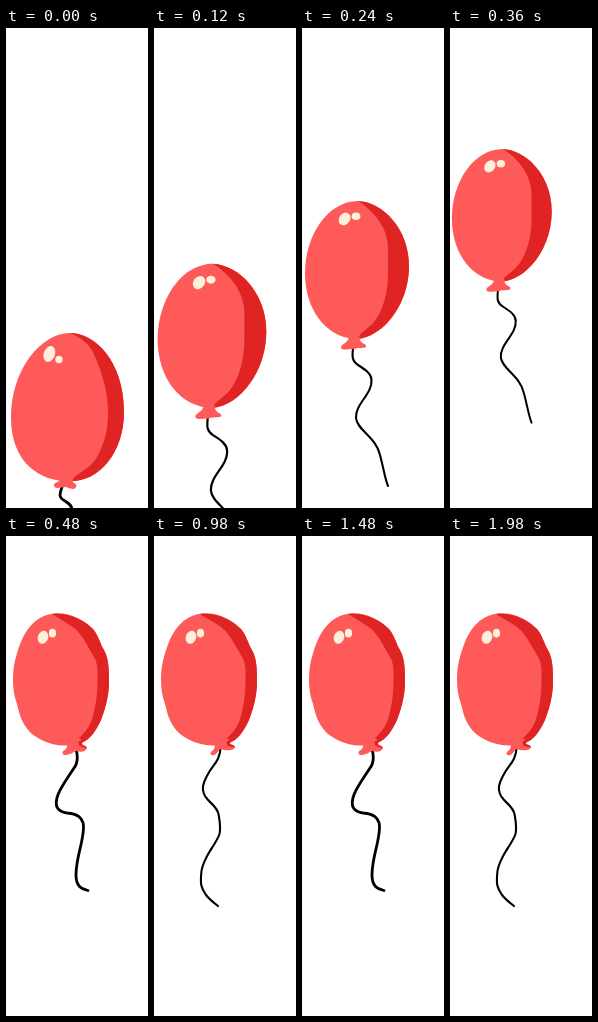
These frames come from a looping animation (142x480 px, 2480 ms). An HTML page:

```html
<!DOCTYPE html>
<html lang="en">
<head>
<meta charset="utf-8">
<title>Balloon</title>
<style>
  html, body { margin: 0; width: 100%; height: 100%; overflow: hidden; background: #fff; }
  .stage { position: relative; width: 142px; height: 480px; overflow: hidden; }
  .strip { position: absolute; left: 0; top: 0; display: block; animation: poses 2480ms step-end infinite; }
  .skin { fill: #ff5a5a; }
  .shade { fill: #e02424; }
  .shine { fill: #fcf0da; }
  .string { fill: none; stroke: #000; stroke-width: 2.1; stroke-linecap: round; stroke-linejoin: round; }
  .bold { stroke-width: 2.8; }

  /* One pose every 142px: the rise, then the string swaying */
  @keyframes poses {
    0%        { transform: translateX(0); }
    4.83871%  { transform: translateX(-142px); }
    9.67742%  { transform: translateX(-284px); }
    14.51613% { transform: translateX(-426px); }
    19.35484% { transform: translateX(-568px); }
    39.51613% { transform: translateX(-710px); }
    59.67742% { transform: translateX(-568px); }
    79.83871%, 100% { transform: translateX(-710px); }
  }
</style>
</head>
<body>
<div class="stage">
<svg class="strip" width="852" height="480" viewBox="0 0 852 480">
  <defs>
    <g id="low">
      <path class="string bold" d="M56 459C53 467 53 470 59 473C64 476 66 478 66 482"/>
      <path class="skin" d="M64 305C88 305 118 332 118 384C118 426 92 453 66 453C36 455 5 436 5 390C5 340 36 305 64 305Z"/>
      <path class="shade" d="M64 305C88 305 118 332 118 384C118 426 92 453 66 453C70 444 82 444 91 429C99 414 102 402 102 384C102 360 94 340 87 324C82 315 74 309 64 305Z"/>
      <path class="skin" d="M55 450C55 454 48 454 48 457C48 461 52 460 60 459C65 461 69 462 70 459C72 455 66 456 66 451Z"/>
      <ellipse class="shine" cx="43.3" cy="326" rx="5.6" ry="8.2" transform="rotate(20 43.3 326)"/>
      <circle class="shine" cx="53" cy="331.5" r="3.7"/>
    </g>
    <g id="mid">
      <path class="string" d="M51 320C50 329 50 333 56 337C64 342 69.5 346 69.5 352C70.5 366 53 376 54 390C55 402 74 409 78 427C82 442 83 451 86 458"/>
      <path class="skin" d="M56 173C80 174 107 200 107 238C107 276 82 308 56 311C26 311 3 284 3 245C3 207 26 173 56 173Z"/>
      <path class="shade" d="M56 173C80 174 107 200 107 238C107 276 82 308 56 311C58 303 68 302 76 288C84 274 86 258 86 244V220C86 202 74 184 56 173Z"/>
      <path class="skin" d="M47 308C47 315 39 316 39 319C39 323 45 321 52 321C58 319 64 321 64 318C64 315 57 316 58 309Z"/>
      <ellipse class="shine" cx="42.6" cy="191" rx="5.4" ry="6.8" transform="rotate(38 42.6 191)"/>
      <ellipse class="shine" cx="54" cy="188.2" rx="4.4" ry="3.8"/>
    </g>
    <g id="top">
      <path class="skin" d="M48 77.5C63 76 78 84 87 93C93 100 94 108 98 114C103 123 103 134 103 146C103 160 99 174 95 184C90 195 84 204 75 207L60 209.5C44 210 29 202 22 194C14 184 13 175 11 168C8 160 7 152 7 143C7 128 11 116 15 106C21 91 32 79 48 77.5Z"/>
      <path class="shade" d="M46 78C63 76 78 84 87 93C93 100 94 108 98 114C103 123 103 134 103 146C103 160 99 174 95 184C90 195 84 204 75 207L71 205C75 199 84 193 87 180C90 168 91.5 158 91.5 144C91.5 134 92 128 88 121C83 113 79 104 73 97C68 90 58 86 46 78Z"/>
      <ellipse class="shine" cx="37" cy="101.3" rx="5.2" ry="6.6" transform="rotate(20 37 101.3)"/>
      <ellipse class="shine" cx="46.5" cy="97.2" rx="3.6" ry="4.4"/>
    </g>
  </defs>

  <use href="#low"/>
  <use href="#mid" transform="translate(142.5 55) scale(1.045)"/>
  <use href="#mid" x="284"/>
  <use href="#mid" transform="translate(425 -45) scale(.96)"/>
  <g transform="translate(568)">
    <path class="string bold" d="M70.5 215C72 222 72 227 68 232C61 243 50 257 50.300 267C50 275 59 277 65 277.500C73 278.500 78 284 77.500 292C77 308 70 321 70 339C70 350 75 353 82 354.500"/>
    <use href="#top"/>
    <path class="skin" d="M59 207C62 210 62 212 57 215C55 219 59 220 64 218L70 215C76 217 80 215 81 212C80 208 73 210 75 203L70 202Z"/>
    <path class="shade" d="M73 205L78 205C75 207 75 209 80 210.500L81 212C76 211 71 210 73 205Z"/>
  </g>
  <g transform="translate(710)">
    <path class="string" d="M66.500 212C66 225 58 230 54 238C49 247 47 253 51 260C56 268 62 269 64.500 278C66 286 67 291 65.500 298C62 309 50 319 47.500 335C46 348 47 352 52 359C56 364 60 367 64 370"/>
    <use href="#top"/>
    <path class="skin" d="M59 207C62 210 61 213 57 216C55 220 60 220 62 218L66 213C72 215 80 215 81 211C79 207 73 210 75 203L70 202Z"/>
    <path class="shade" d="M73 205L78 205C75 207 75 208 80 209.500L81 211.500C76 211 71 210 73 205Z"/>
  </g>
</svg>
</div>
</body>
</html>
```
